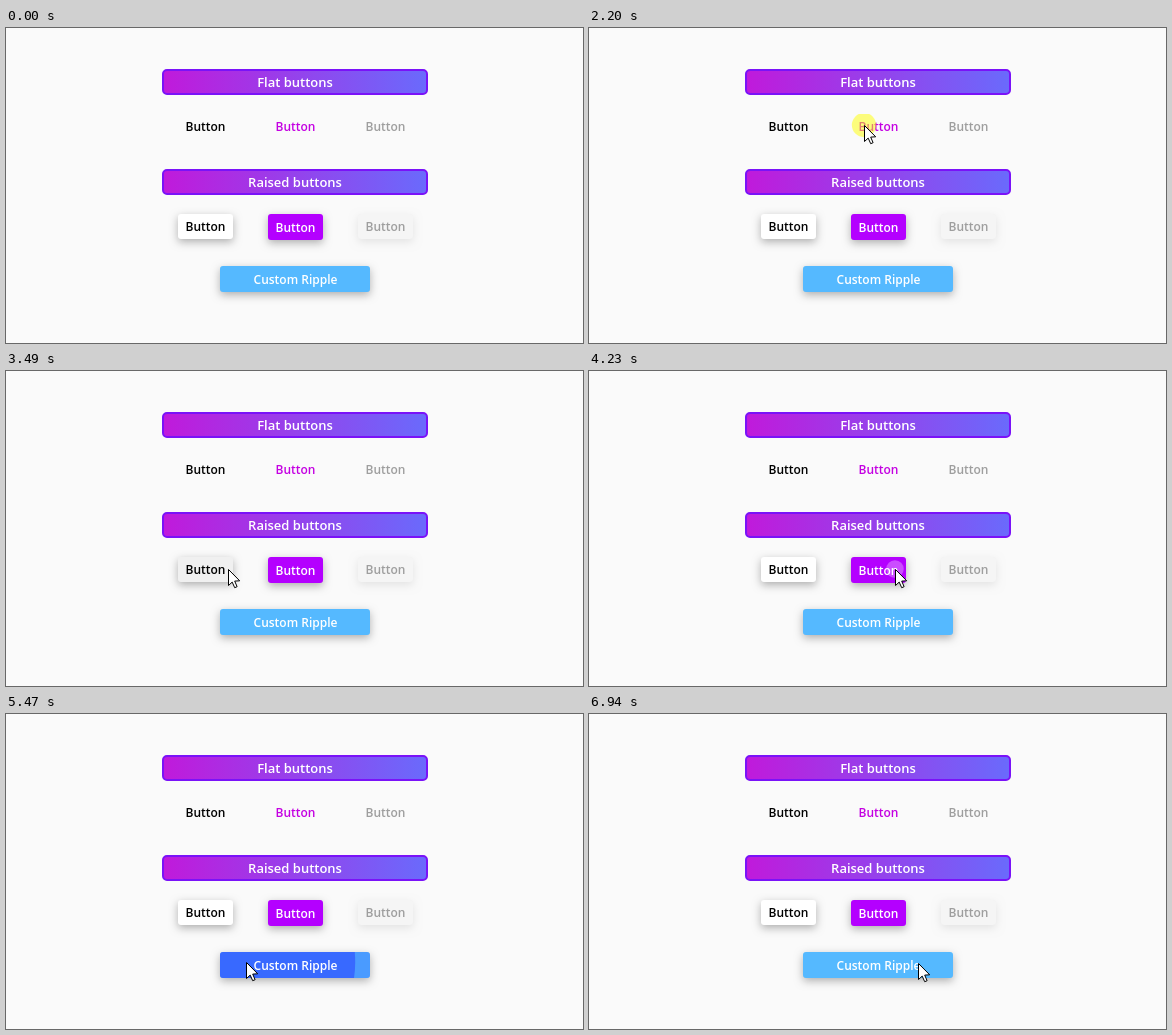
Animation of 577 by 315 pixels, one loop 7.1 s. Source, as an HTML page with a canvas:

```html
<!DOCTYPE html>
<html lang="en">
<head>
<meta charset="utf-8">
<title>Ripple buttons</title>
<style>
html, body { margin: 0; width: 100%; height: 100%; overflow: hidden; background: #fafafa; }
canvas { display: block; }
</style>
</head>
<body>
<canvas id="stage" width="577" height="315"></canvas>
<script>
const ctx = document.getElementById('stage').getContext('2d');
const LOOP = 7100, RIPPLE = 710, GROW = 350;

const buttons = {
  flat: { x: 172, y: 86, w: 55, h: 25, ink: '#000', ripple: '#000', alpha: 0.06 },
  flatPink: { x: 262, y: 86, w: 55, h: 25, ink: '#c400e2', ripple: '#ff0', alpha: 0.5 },
  flatOff: { x: 352, y: 86, w: 55, h: 25, ink: '#9e9e9e' },
  raised: { x: 172, y: 186, w: 55, h: 25, ink: '#000', fill: '#fff', ripple: '#000', alpha: 0.06 },
  raisedPink: { x: 262, y: 186, w: 55, h: 26, ink: '#fff', fill: '#b400ff', ripple: '#fff', alpha: 0.3, baseline: 204 },
  raisedOff: { x: 352, y: 186, w: 55, h: 25, ink: '#9e9e9e', fill: '#f5f5f5', shadow: 0.09 },
  custom: { x: 214, y: 238, w: 150, h: 26, ink: '#fff', fill: '#55b9ff', ripple: '#2f4cff', alpha: 0.63,
            tint: 0.28, label: 'Custom Ripple', baseline: 256 }
};

// [start, button, x, y]
const clicks = [
  [1050, buttons.flat, 203, 92],
  [2130, buttons.flatPink, 275, 97],
  [3170, buttons.raised, 222, 198],
  [4180, buttons.raisedPink, 306, 198],
  [5177, buttons.custom, 240, 248],
  [6230, buttons.custom, 329, 249]
];

// [start, end, x, y, lift of the path's middle]
const moves = [
  [580, 760, 203, 92, 0],
  [1540, 1860, 275, 97, 13],
  [2500, 2870, 222, 198, 0],
  [3890, 4040, 306, 198, 2],
  [4628, 4992, 240, 248, 0],
  [5750, 6100, 329, 249, 0]
];

const clamp = v => Math.max(0, Math.min(1, v));
const ease = p => (1 - Math.cos(Math.PI * p)) / 2;

function roundRect(x, y, w, h, r) {
  ctx.beginPath();
  ctx.roundRect(x, y, w, h, r);
}

function label(text, x, baseline, size, color) {
  ctx.font = `600 ${size}px "Open Sans", "Noto Sans", sans-serif`;
  ctx.textAlign = 'center';
  ctx.fillStyle = color;
  ctx.fillText(text, x, baseline);
}

function header(text, y) {
  const gradient = ctx.createLinearGradient(158, 0, 420, 0);
  gradient.addColorStop(0, '#c01adb');
  gradient.addColorStop(1, '#6a6afc');
  roundRect(157, y + 1, 264, 24, 4);
  ctx.fillStyle = gradient;
  ctx.fill();
  ctx.strokeStyle = '#7a12f8';
  ctx.lineWidth = 2;
  ctx.stroke();
  label(text, 289, y + 18, 13, '#fff');
}

function drawRipples(b, t) {
  ctx.save();
  roundRect(b.x, b.y, b.w, b.h, 3);
  ctx.clip();
  ctx.fillStyle = b.ripple;
  for (const [start, target, x, y] of clicks) {
    const age = t - start;
    if (target !== b || age < 0 || age >= RIPPLE) continue;
    const fade = 1 - clamp((age - GROW) / (RIPPLE - GROW));
    if (b.tint) {
      ctx.globalAlpha = b.tint * fade * clamp(age / 150);
      ctx.fillRect(b.x, b.y, b.w, b.h);
    }
    ctx.globalAlpha = b.alpha * fade;
    ctx.beginPath();
    ctx.arc(x, y, (b.w > 100 ? 130 : 60) * clamp(age / GROW), 0, Math.PI * 2);
    ctx.fill();
  }
  ctx.restore();
}

function drawButton(b, t) {
  if (b.fill) {
    ctx.save();
    ctx.shadowColor = `rgba(0,0,0,${b.shadow || 0.3})`;
    ctx.shadowBlur = 8;
    ctx.shadowOffsetY = 3;
    roundRect(b.x, b.y, b.w, b.h, 3);
    ctx.fillStyle = b.fill;
    ctx.fill();
    ctx.restore();
  }
  const write = () => label(b.label || 'Button', b.x + b.w / 2 + (b.label ? 0.5 : 0), b.baseline || b.y + 17, 12, b.ink);
  // The wide button keeps its text above the ripple.
  if (!b.tint) write();
  if (b.ripple) drawRipples(b, t);
  if (b.tint) write();
}

function drawCursor(t) {
  if (t < moves[0][0]) return;
  let x = 198, y = -19;
  for (const [start, end, toX, toY, lift] of moves) {
    if (t < start) break;
    const p = ease(clamp((t - start) / (end - start)));
    x += (toX - x) * p;
    y += (toY - y) * p - lift * 4 * p * (1 - p);
  }
  ctx.save();
  ctx.translate(Math.round(x) + 0.5, Math.round(y) + 0.5);
  ctx.beginPath();
  for (const [px, py] of [[0, 0], [0, 16], [3.7, 12.6], [6.2, 18.2], [8.6, 17.2], [6.2, 11.6], [11.2, 11.3]]) ctx.lineTo(px, py);
  ctx.closePath();
  ctx.fillStyle = '#fff';
  ctx.fill();
  ctx.strokeStyle = '#000';
  ctx.lineWidth = 1;
  ctx.stroke();
  ctx.restore();
}

function draw() {
  const t = performance.now() % LOOP;
  ctx.fillStyle = '#fafafa';
  ctx.fillRect(0, 0, 577, 315);
  header('Flat buttons', 41);
  header('Raised buttons', 141);
  Object.values(buttons).forEach(b => drawButton(b, t));
  drawCursor(t);
  requestAnimationFrame(draw);
}
draw();
</script>
</body>
</html>
```
